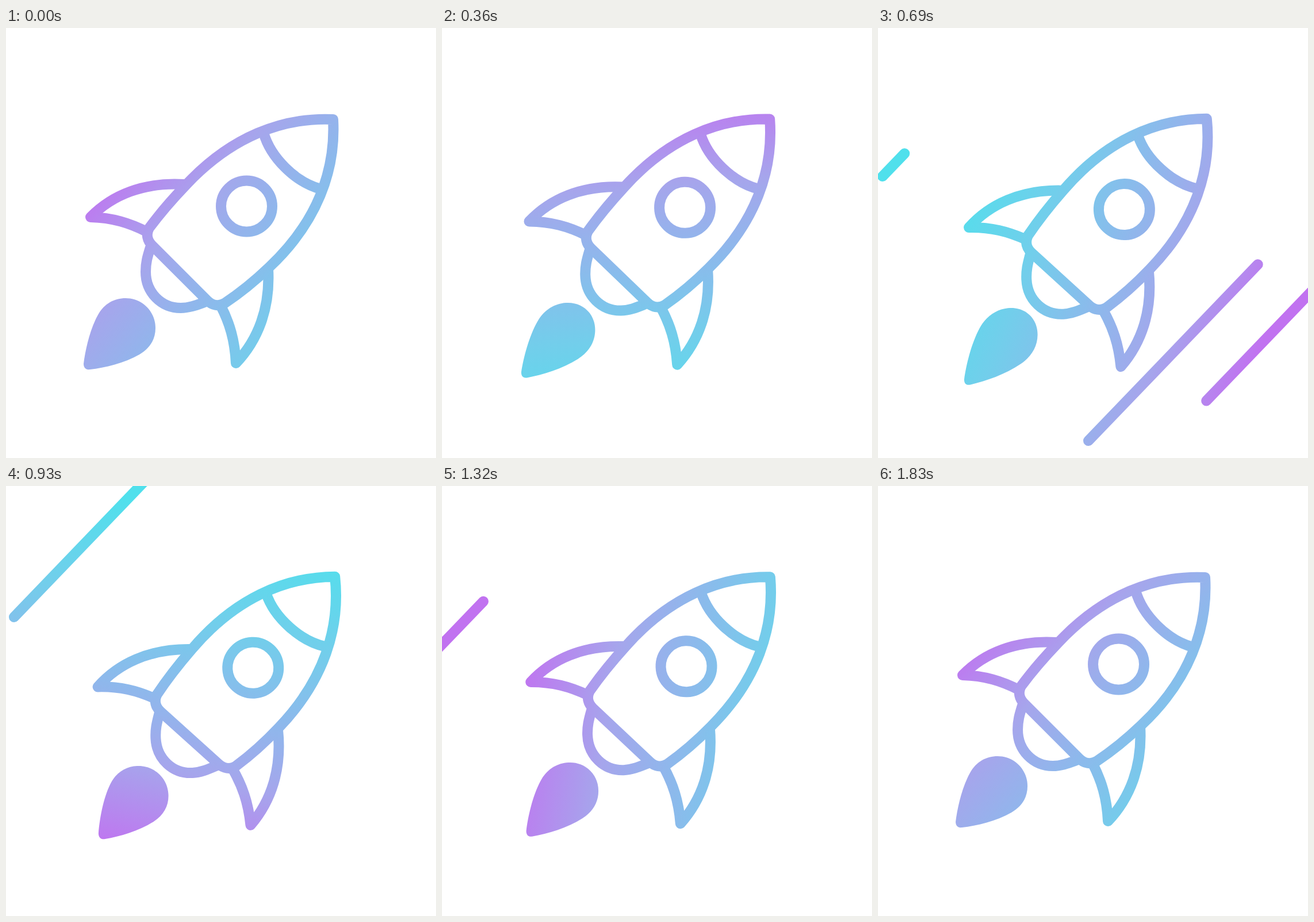
Animation, 748 px wide and 748 px high, one loop 1860 ms. Source, as an HTML page:

```html
<!DOCTYPE html>
<html lang="en">
<head>
<meta charset="utf-8">
<title>Rocket</title>
<style>
  html, body { margin: 0; width: 100%; height: 100%; overflow: hidden; background: #fff; }
  svg { display: block; width: 100vw; height: 100vh; }
</style>
</head>
<body>
<svg viewBox="0 0 748 748">
  <defs>
    <linearGradient id="paint" gradientUnits="userSpaceOnUse">
      <stop offset="0" stop-color="#50e0ec"/>
      <stop offset=".28" stop-color="#72ceeb"/>
      <stop offset=".7" stop-color="#a6a5ec"/>
      <stop offset=".96" stop-color="#c172f0"/>
    </linearGradient>
    <mask id="shapes" maskUnits="userSpaceOnUse" x="0" y="0" width="748" height="748">
      <g fill="none" stroke="#fff" stroke-width="18" stroke-linecap="round" stroke-linejoin="round">
        <path id="streaks"/>
        <g id="rocket">
          <path d="M569 159C481 155 392 189 314 272C290 297 266 325 249 348C243 359 246 370 254 378L350 474C358 482 369 485 380 479C404 463 433 440 458 416C541 338 574 248 569 159Z"/>
          <path d="M309 272C240 268 185 290 147 329C185 330 215 339 246 355"/>
          <path d="M456 419C460 488 438 543 400 583C398 543 389 513 373 482"/>
          <path d="M448 182C460 225 503 268 547 280"/>
          <path d="M251 382C246 398 243 408 243 424C243 460 270 487 304 487C320 487 334 481 348 476"/>
          <circle cx="418.5" cy="310" r="44.5"/>
          <path id="flame" fill="#fff" stroke="none" d="M135 584C138 560 146 524 160 499C171 479 189 470 208 470C237 470 260 493 260 522C260 541 251 557 232 568C206 583 172 591 146 594C139 595 135 591 135 584Z"/>
        </g>
      </g>
    </mask>
  </defs>
  <rect width="748" height="748" fill="url(#paint)" mask="url(#shapes)"/>
</svg>
<script>
const LOOP = 1860;
const STREAK = 700;
const DIR = { x: 0.693, y: -0.721 };
const el = id => document.getElementById(id);
const clamp = v => Math.min(1, Math.max(0, v));
const smooth = v => v * v * (3 - 2 * v);
const ramp = (t, from, to) => smooth(clamp((t - from) / (to - from)));

// x, y: where the streak ends; head and tail: [start, end] of their travel
const streaks = [
  { x: 365, y: 743, head: [0, 180], tail: [134, 314] },
  { x: 600, y: 834, head: [270, 510], tail: [480, 660] },
  { x: 8, y: 258, head: [342, 582], tail: [541, 721] },
  { x: 366, y: 718, head: [402, 642], tail: [613, 793] },
  { x: 440, y: 785, head: [532, 772], tail: [745, 925] },
  { x: 14, y: 228, head: [690, 930], tail: [870, 1050] },
  { x: -10, y: 286, head: [980, 1220], tail: [1187, 1367] },
  { x: 365, y: 743, head: [1350, 1530], tail: [1430, 1610] }
];

function streakPath({ x, y, head, tail }, t) {
  const h = ramp(t, ...head), e = ramp(t, ...tail);
  if (h <= e) return "";
  const at = p => {
    const d = STREAK * (1 - p);
    return `${x + DIR.x * d} ${y + DIR.y * d}`;
  };
  return `M${at(e)}L${at(h)}`;
}

// Ease with handles at .347 and .387, solved by bisection
function spinEase(x) {
  let lo = 0, hi = 1;
  for (let i = 0; i < 24; i++) {
    const s = (lo + hi) / 2, r = 1 - s;
    const bx = 3 * 0.347 * s * r * r + 3 * 0.387 * s * s * r + s * s * s;
    if (bx < x) lo = s; else hi = s;
  }
  return smooth(lo);
}

function setGradient(t) {
  const angle = (221 + 360 * spinEase(t / LOOP)) * Math.PI / 180;
  const dx = 315 * Math.cos(angle), dy = 315 * Math.sin(angle);
  const ends = { x1: 416 - dx, y1: 396 - dy, x2: 416 + dx, y2: 396 + dy };
  for (const key in ends) el("paint").setAttribute(key, ends[key]);
}

function draw(t) {
  setGradient(t);
  const tilt = ramp(t, 0, 885) - ramp(t, 885, LOOP);
  el("rocket").setAttribute("transform", `rotate(${-3 * tilt} 545 97)`);
  const burn = ramp(t, 0, 600) - ramp(t, 600, 930) + ramp(t, 1200, 1500) - ramp(t, 1500, 1830);
  el("flame").setAttribute("transform",
    `translate(245 485) rotate(135) scale(${1 + 0.1 * burn} ${1 - 0.06 * burn}) rotate(-135) translate(-245 -485)`);
  el("streaks").setAttribute("d", streaks.map(s => streakPath(s, t)).join(""));
}

let origin;
function tick(now) {
  origin ??= now;
  draw((now - origin) % LOOP);
  requestAnimationFrame(tick);
}
draw(0);
requestAnimationFrame(tick);
</script>
</body>
</html>
```
